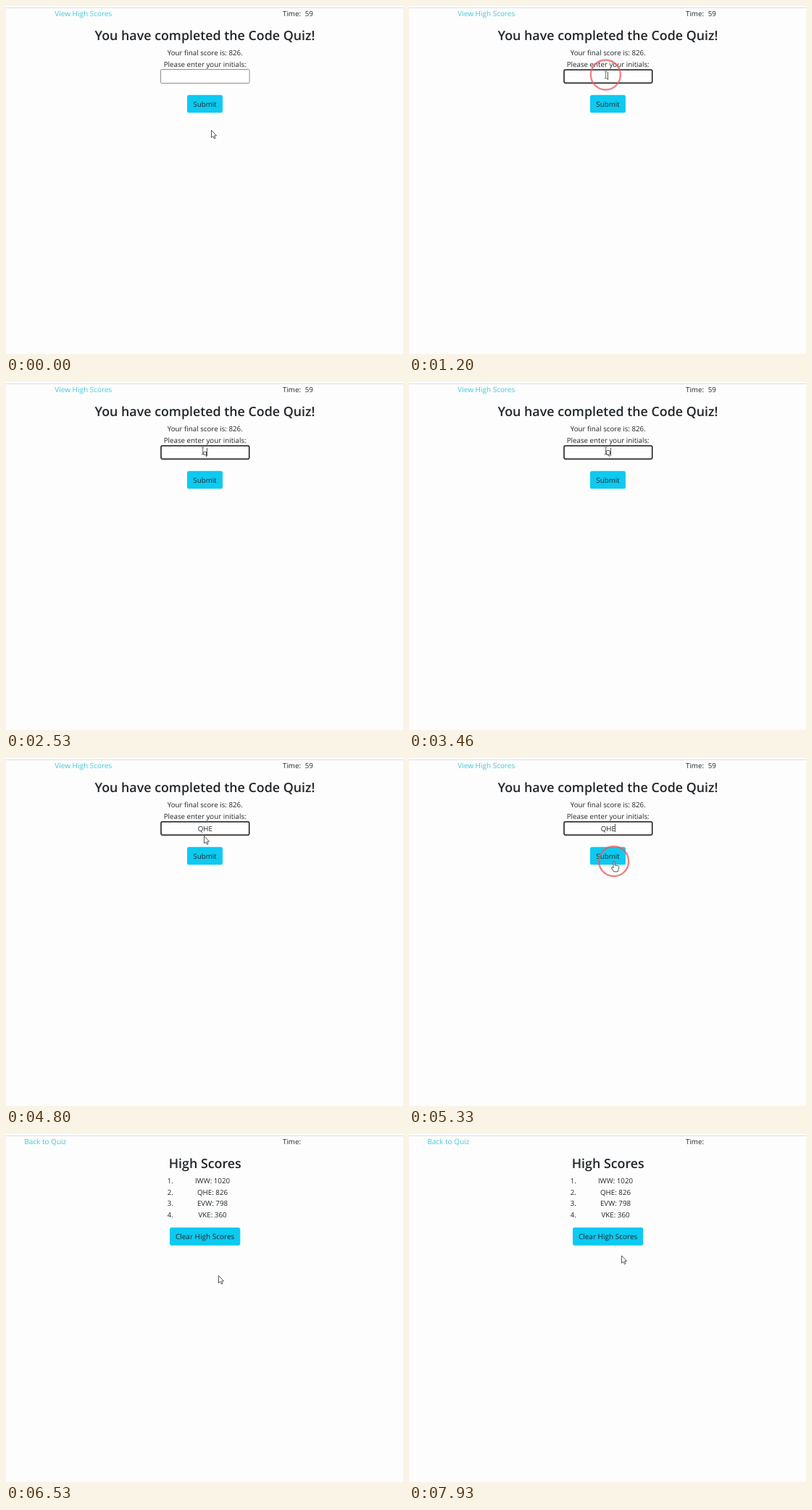
These frames come from a looping animation (548x480 px, 8 s). An HTML page:

```html
<!DOCTYPE html>
<html lang="en">
<head>
<meta charset="utf-8">
<title>Code Quiz</title>
<style>
  html, body { margin: 0; width: 100%; height: 100%; overflow: hidden; background: #fdfdfd; }
  svg { display: block; }
  text { font: 9.75px "Open Sans", "Noto Sans", sans-serif; fill: #212529; text-rendering: geometricPrecision; white-space: pre; }
  .mid { text-anchor: middle; }
  .wide { font-size: 10px; }
  .link { fill: #45c7d9; }
  .title { font-size: 17.83px; font-weight: 600; }
  .btn { fill: #0dcaf0; }
  .pointer { fill: #fff; stroke: #444; stroke-width: .9; stroke-linejoin: round; }
</style>
</head>
<body>
<svg width="548" height="480" viewBox="0 0 548 480">
  <rect width="548" height="480" fill="#fdfdfd"/>
  <rect y="2" width="548" height="1" fill="#dedede"/>
  <text x="382" y="14.3">Time:</text>

  <g id="entry">
    <text class="link wide" x="67.3" y="14.3">View High Scores</text>
    <text x="412.7" y="14.3">59</text>
    <text class="mid title" x="274.5" y="47">You have completed the Code Quiz!</text>
    <text class="mid" x="274.7" y="68.1">Your final score is: 826.</text>
    <text class="mid" x="274.7" y="83.5">Please enter your initials:</text>
    <rect id="field" fill="#fff"/>
    <text id="typed" class="mid" x="274.8" y="101.2"></text>
    <rect id="caret" y="91" width="1" height="11" fill="#555"/>
    <rect class="btn" x="250" y="122.7" width="49" height="24.6" rx="2.6"/>
    <text class="mid" x="274.5" y="138.7">Submit</text>
  </g>

  <g id="scores">
    <text class="link wide" x="25.3" y="14.3">Back to Quiz</text>
    <text class="mid title" x="274.7" y="47">High Scores</text>
    <rect class="btn" x="226" y="129" width="97.3" height="24.7" rx="2.6"/>
    <text class="mid wide" x="274.6" y="145.3">Clear High Scores</text>
  </g>

  <circle id="ring" r="20.5" fill="none" stroke="#f0575c" stroke-opacity=".75" stroke-width="2.4"/>
  <g id="cursor">
    <path id="arrow" class="pointer" d="M.5 .3V10.6L2.8 8.5L4.4 12L6 11.3L4.5 7.9H7.6Z"/>
    <path id="beam" fill="none" stroke="#555" stroke-width=".9" d="M-2-5H-.6L0-4.5L.6-5H2M0-4.5V4.5M-2 5H-.6L0 4.5L.6 5H2"/>
    <path id="hand" class="pointer" d="M-1 1Q0-.6 1 1V5.4L5.4 6.2Q6.8 6.6 6.7 8.2L6.2 11.2L5.2 14.3H-.3L-3.4 9.6Q-3.6 7.7-1.9 8.4L-1 9.3Z"/>
  </g>
</svg>
<script>
const $ = id => document.getElementById(id);
const LOOP = 8000, PAGE_CHANGE = 5400, FOCUS = 1100, BLINK = 530;
const rows = ["IWW: 1020", "QHE: 826", "EVW: 798", "VKE: 360"];

// [time, field text]
const typing = [[FOCUS, ""], [2300, "q"], [2900, ""], [3350, "Q"], [3650, "QH"], [3900, "QHE"]];
// [time, x, y] of the pointer's hot spot
const path = [
  [0, 283, 171], [150, 283, 171], [820, 271.7, 95], [4560, 271.7, 95],
  [4800, 273, 107.3], [5150, 283, 142.5], [5680, 283, 142.5], [5980, 293, 195],
  [7200, 293, 195], [7800, 293, 167.5], [LOOP, 293, 167.5]
];
const clicks = [[1050, 1400], [5260, 5500]];

rows.forEach((row, i) => {
  const y = 68.1 + i * 15.6;
  $("scores").insertAdjacentHTML("beforeend",
    `<text x="222.7" y="${y}">${i + 1}.</text><text class="mid" x="285" y="${y}">${row}</text>`);
});

const show = (id, on) => $(id).setAttribute("visibility", on ? "inherit" : "hidden");
const set = (id, attrs) => {
  for (const name in attrs) $(id).setAttribute(name, attrs[name]);
};
const inside = (x, y, l, t, r, b) => x >= l && x <= r && y >= t && y <= b;

function pointerAt(t) {
  const i = path.findIndex(p => p[0] > t);
  const [t0, x0, y0] = path[i - 1], [t1, x1, y1] = path[i];
  const u = (t - t0) / (t1 - t0), k = u * u * (3 - 2 * u);
  return [x0 + (x1 - x0) * k, y0 + (y1 - y0) * k];
}

function draw(t) {
  const entry = t < PAGE_CHANGE;
  const focused = t >= FOCUS;
  show("entry", entry);
  show("scores", !entry);

  set("field", focused
    ? { x: 214, y: 88, width: 121.7, height: 18.2, rx: 1.6, stroke: "#151515", "stroke-width": 1.5 }
    : { x: 213.5, y: 87.5, width: 122.6, height: 19, rx: 1.4, stroke: "#8c8c8c", "stroke-width": 1 });

  const [since, text] = typing.filter(k => k[0] <= t).pop() || [0, ""];
  $("typed").textContent = text;
  const half = text ? $("typed").getComputedTextLength() / 2 : 0;
  set("caret", { x: Math.floor(274.8 + half) });
  show("caret", entry && focused && (t - since) % (2 * BLINK) < BLINK);

  const [x, y] = pointerAt(t);
  const overField = entry && inside(x, y, 213, 87, 336, 107);
  const overButton = entry ? inside(x, y, 250, 123, 299, 147) : inside(x, y, 226, 129, 323, 154);
  set("cursor", { transform: `translate(${x} ${y})` });
  show("beam", overField);
  show("hand", overButton);
  show("arrow", !overField && !overButton);

  set("ring", { cx: x - .3, cy: y });
  show("ring", clicks.some(([a, b]) => t >= a && t < b));
}

function tick() {
  draw(performance.now() % LOOP);
  requestAnimationFrame(tick);
}
tick();
</script>
</body>
</html>
```
